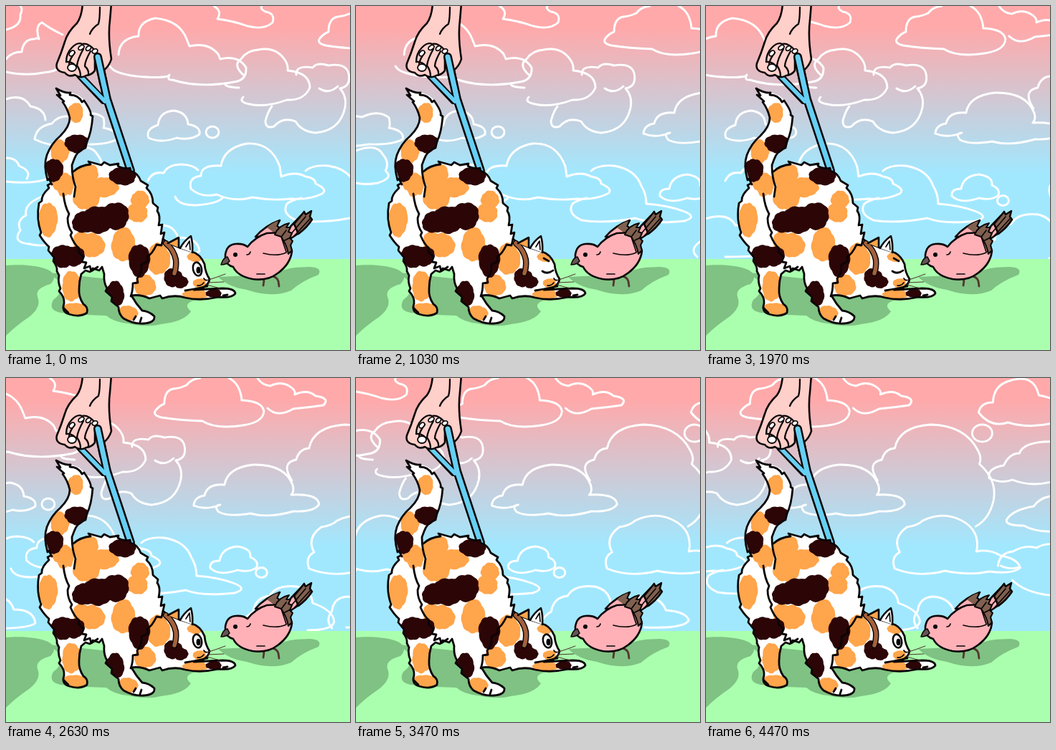
Write an HTML page that moves like this. It is 480 by 480 pixels and loops after 4510 ms.

```html
<!DOCTYPE html>
<html lang="en">
<head>
<meta charset="utf-8">
<title>Cat and bird</title>
<style>
html, body { margin: 0; width: 100%; height: 100%; overflow: hidden; }
svg { display: block; width: 100vw; height: 100vh; }
path, ellipse, circle { stroke-linecap: round; stroke-linejoin: round; }
.line { fill: none; stroke: #0a0506; stroke-width: 2.8; }
.fine { fill: none; stroke: #0a0506; stroke-width: 1.7; }
.thin { fill: none; stroke: #4a302c; stroke-width: 1; }
.ink { stroke: #0a0506; stroke-width: 2.6; }
.strap { fill: none; stroke: #66cff3; }
#clouds * { fill: none; stroke: #fff; stroke-width: 2.9; }
.shade { fill: #7fc283; }
.orange { fill: #ffa54b; }
.dark { fill: #2c0507; }
.skin { fill: #ffcfca; }
.pink { fill: #ffb1b7; }
.brown { fill: #80604f; }
</style>
</head>
<body>
<svg viewBox="0 0 480 480" preserveAspectRatio="none">
  <defs>
    <linearGradient id="sky" x1="0" y1="30" x2="0" y2="235" gradientUnits="userSpaceOnUse">
      <stop offset="0" stop-color="#ffa9aa"/>
      <stop offset="1" stop-color="#a1e8ff"/>
    </linearGradient>
    <clipPath id="bodyClip"><path id="bodyShape"/></clipPath>
    <clipPath id="tailClip"><path id="tailShape"/></clipPath>
  </defs>

  <rect width="480" height="480" fill="url(#sky)"/>
  <g id="clouds"></g>
  <rect y="353" width="480" height="127" fill="#aaffae"/>

  <g class="shade">
    <path d="M0 362C20 360 50 362 62 370Q72 378 62 388Q40 394 44 406Q50 420 32 434Q14 446 0 460Z"/>
    <path d="M60 372L76 386Q80 400 66 410Q58 424 76 428L112 431L140 432Q150 441 170 443Q198 449 216 444Q250 440 258 426Q246 416 262 411L312 407L300 396L180 385Z"/>
    <path d="M296 378Q310 392 336 396Q372 408 398 397Q412 384 436 375Q442 365 424 364Q396 364 384 370L340 376Z"/>
  </g>

  <!-- leash -->
  <path class="line" style="stroke-width:10" d="M103 97L136 132"/>
  <path class="line" style="stroke-width:12" d="M128 70L141 130L174 230"/>
  <path class="strap" stroke-width="5.5" d="M103 97L138 133"/>
  <path class="strap" stroke-width="7" d="M128 70L141 130L174 230"/>

  <!-- hand -->
  <path class="skin ink" d="M107 -4Q106 14 99 24Q86 36 82 50Q77 66 71 80Q68 91 82 93Q88 100 96 96Q104 102 112 97Q120 96 124 90L124 68L136 90Q144 84 147 74Q142 42 145 20L147 -4Z"/>
  <path class="line" style="stroke-width:12" d="M128 71L136 108"/>
  <path class="strap" stroke-width="7" d="M128 71L137 112"/>
  <path class="line" style="stroke-width:2.3" d="M131 2Q131 18 129 25Q120 31 117 39M84 78Q84 66 92 58Q100 50 106 53Q115 51 124 62M96 65Q89 74 88 81M108 60Q100 74 99 83Q104 90 104 98M118 63Q110 77 110 84Q116 89 115 96M84 78Q92 77 98 84"/>
  <g fill="#fff" class="ink" style="stroke-width:1.8">
    <ellipse cx="92" cy="86" rx="6" ry="5"/>
    <ellipse cx="92" cy="66" rx="4.5" ry="3" transform="rotate(-48 92 66)"/>
    <ellipse cx="105" cy="58" rx="4.5" ry="2.8" transform="rotate(-35 105 58)"/>
    <ellipse cx="115" cy="59" rx="4" ry="2.8" transform="rotate(-40 115 59)"/>
    <ellipse cx="124" cy="63" rx="4" ry="3" transform="rotate(-25 124 63)"/>
  </g>

  <!-- cat -->
  <use href="#bodyShape" fill="#fff"/>
  <g id="bodySpots" clip-path="url(#bodyClip)"></g>
  <use href="#bodyShape" class="line"/>
  <use href="#tailShape" fill="#fff"/>
  <g id="tailSpots" clip-path="url(#tailClip)"></g>
  <path class="line" d="M64 249L60 241L58 243Q52 222 57 208Q63 192 76 181Q89 168 89 156Q86 143 79 134L81 133L71 124L76 125L70 115Q82 122 90 121L89 124Q101 124 106 134L109 132Q120 148 118 152L121 154Q119 178 113 189L111 198Q99 202 95 214L92 222Q92 240 97 252L95 266"/>
  <path class="line" d="M80 262Q82 280 88 290L86 296Q86 308 92 316L90 320Q96 334 102 338L101 343L108 350L106 357L112 358L109 366L117 363L119 370L128 364"/>
  <path class="line" d="M219 325L217 334L210 333Q204 346 197 350L198 356L189 361Q190 374 183 380L184 386L177 387Q177 398 174 405M80 421L87 428M178 438L181 433M187 441L189 435M303 404L309 403M250 397Q268 394 281 391"/>
  <path d="M223 331Q234 340 237 354Q238 364 235 373" fill="none" stroke="#0a0506" stroke-width="8.5"/>
  <path d="M223 331Q234 340 237 354Q238 364 235 373" fill="none" stroke="#a3613b" stroke-width="5.5"/>
  <path class="orange ink" d="M226 331L241 323L241 337"/>
  <path class="ink" fill="#fff" d="M243 338Q248 328 258 321Q261 331 260 344"/>
  <path class="fine" d="M251 336L256 328L257 340M276 380Q278 384 283 382M276 386Q272 391 267 390"/>
  <g id="open">
    <ellipse class="ink" cx="267" cy="367" rx="6" ry="9.5" fill="#fff" transform="rotate(-12 267 367)"/>
    <ellipse cx="268.5" cy="368.5" rx="3" ry="4.8"/>
  </g>
  <path id="shut" class="line" d="M260 370Q267 375 275 369M262 352L269 356"/>
  <path class="thin" d="M280 383Q293 379 306 374M281 386L304 385M280 389L299 394"/>

  <!-- bird -->
  <path class="line" style="stroke:#56352f" d="M356 379L360 383L359 390M367 376Q378 377 380 384L381 391"/>
  <path class="pink ink" d="M388 318Q400 304 411 293L418 309Q408 318 398 324Z"/>
  <path class="brown ink" d="M402 304L416 287L418 291L426 286L424 294L427 298Q420 309 408 318Z"/>
  <path class="fine" d="M396 320L418 294M402 321L424 297"/>
  <path class="pink ink" d="M348 322Q362 306 382 299L378 307L381 309L374 322Z"/>
  <path class="brown" d="M364 309Q372 302 380 300L377 308L379 310L375 317Z"/>
  <path class="pink ink" d="M306 347Q308 333 320 332Q331 331 337 336Q348 322 364 317L384 316Q396 327 399 342Q397 360 379 373Q365 384 344 381Q323 377 317 364Q308 362 306 353Z"/>
  <path class="brown ink" style="stroke-width:2" d="M375 319Q380 306 395 303L391 309L397 309L394 315L399 317L396 324L400 328L397 334L399 341L394 346Q392 334 384 322Z"/>
  <path class="fine" d="M385 321L391 313M389 327L397 323M359 345Q378 350 391 344M384 322L391 343M350 374L361 374M336 347Q340 347 341 343"/>
  <path class="ink" fill="#665455" style="stroke-width:1.5" d="M309 350Q303 351 300 361Q308 361 312 356Z"/>
  <circle cx="320" cy="347" r="3"/>
</svg>

<script>
const LOOP = 4510, STEP = 2.9, FPS = 30;
const NS = "http://www.w3.org/2000/svg";
const $ = id => document.getElementById(id);

function add(parent, tag, attrs) {
  const el = document.createElementNS(NS, tag);
  for (const k in attrs) el.setAttribute(k, attrs[k]);
  parent.appendChild(el);
  return el;
}

// Outlines laid out on one long strip that slides left.
const clouds = [
  "M0 33Q22 28 20 12Q24 4 20 0M0 74Q8 64 22 64Q24 46 40 46Q44 44 46 46Q40 28 50 23Q62 32 79 40M0 92Q28 98 52 93Q68 92 78 84",
  "M145 84Q150 94 182 98Q212 101 226 98M157 68Q158 45 185 42Q184 22 208 17Q242 20 252 46L256 56Q282 50 296 67L299 74Q324 68 335 86Q336 104 318 106Q270 115 232 103Q224 104 228 96",
  "M290 0Q302 7 295 18Q318 21 337 28Q360 34 372 23Q376 10 362 8Q354 4 357 0",
  "M306 108Q304 113 325 114M331 96Q316 82 328 74Q336 62 352 61Q376 56 389 75Q394 82 393 90Q424 93 424 114Q416 132 392 131Q362 142 340 137Q324 134 331 127",
  "M405 96Q404 82 428 86Q434 78 450 83Q474 79 478 94Q482 112 466 115Q476 126 473 142Q466 174 432 177Q412 175 404 161Q386 154 374 168Q362 172 362 160Q366 146 371 140M463 112Q450 124 437 115",
  "M540 0Q556 8 558 31Q586 32 589 46Q588 62 560 66Q522 72 503 60Q470 59 446 55Q433 52 438 45Q444 38 450 36Q450 17 463 15Q473 14 481 10Q488 1 500 0",
  "M580 0Q586 10 598 11Q612 4 624 11Q634 17 632 23Q650 15 661 25Q682 28 672 38Q652 41 630 43Q608 56 594 42",
  "M0 130Q24 122 34 140Q54 143 55 159M40 186Q42 168 64 164Q74 150 98 155Q122 144 136 156Q138 166 136 170Q158 174 155 186Q140 194 108 193Q68 200 40 186",
  "M199 184Q194 172 212 166Q214 147 235 146Q253 149 254 165Q272 168 270 179Q258 188 238 184Q216 192 199 184",
  "M0 212Q15 212 18 223Q36 230 29 241M0 245Q42 249 60 240M55 264Q24 275 28 292Q14 299 20 313Q8 330 32 332Q52 337 72 330",
  "M80 206Q118 188 128 208Q137 219 131 230Q143 240 120 247Q102 250 90 247",
  "M198 244Q204 230 220 233Q226 221 246 221Q262 222 268 229M236 266Q240 278 265 278Q294 276 302 268",
  "M258 255Q254 239 272 237Q272 221 300 223Q304 198 336 192Q370 190 382 224L384 238Q404 230 418 238Q432 240 432 248Q450 256 441 262Q422 271 398 269Q372 272 344 267Q318 274 294 263Q272 268 258 255",
  "M418 230Q428 221 450 223Q480 228 488 251Q495 262 495 276Q524 278 546 286Q568 294 548 300Q502 305 480 296Q436 304 405 299Q384 290 392 276Q400 270 412 268",
  "M170 297Q202 287 212 306Q234 304 240 323Q268 323 270 342Q262 350 198 350",
  "M491 178Q492 166 506 164Q510 147 534 149Q538 125 574 121Q618 120 629 149Q632 158 627 163Q664 161 666 176Q660 187 630 186Q596 196 570 189Q540 194 526 187Q518 178 528 177Q508 185 491 178",
  "M514 265Q513 255 527 255Q530 237 552 235Q572 238 570 250Q582 255 579 264Q570 272 552 268Q526 277 514 265",
  "M566 350Q553 339 574 326Q577 306 597 304Q606 288 635 291Q655 296 657 314Q686 324 687 340Q685 352 650 352",
  "M684 349Q674 338 684 325Q686 306 706 305Q728 307 734 324Q762 326 766 338Q760 350 704 348",
  "M628 143Q612 118 634 114Q638 99 652 98Q658 68 702 65Q750 66 768 101Q774 112 770 120Q795 142 790 170Q784 197 765 207",
  "M652 266Q646 250 659 243Q648 223 669 208Q684 206 691 199Q716 187 739 196Q769 208 767 236L766 242Q784 238 800 248Q824 252 827 265Q816 274 784 270Q756 276 722 269Q685 279 652 266",
  "M769 48Q772 34 789 34Q790 10 812 4Q846 -7 853 24Q868 27 880 32M769 48Q786 70 810 62Q842 72 880 61",
  "M784 140Q780 126 804 122Q812 105 826 105Q832 87 880 89M784 140Q802 148 816 142Q846 154 880 142",
  "M880 164Q856 164 846 179Q816 184 808 198Q806 206 832 206Q850 216 880 214",
  "M796 262Q798 244 817 242Q834 232 850 237Q860 230 880 232M800 262Q812 268 826 264M816 282Q836 302 880 304"
];
for (const d of clouds) add($("clouds"), "path", { d });
for (const [cx, cy, rx, ry] of [[288, 176, 9, 8], [585.5, 271.5, 8, 7], [774, 77, 14, 12]])
  add($("clouds"), "ellipse", { cx, cy, rx, ry });

$("bodyShape").setAttribute("d",
  "M66 246L58 250L60 254Q49 264 50 272L46 275Q42 298 49 316L47 320Q54 331 60 336L59 341L67 351L66 356Q72 364 71 370L74 376" +
  "Q72 385 76 394L74 398Q82 406 81 415Q77 427 88 430Q103 435 113 428Q115 420 108 416Q101 406 102 394Q102 384 105 374L111 369" +
  "L117 371L121 366L130 369L134 364L137 374Q136 386 141 394L139 398L148 406L147 412L157 420Q157 430 164 436Q178 444 192 443" +
  "Q208 442 207 433Q200 426 190 425Q181 415 175 404Q188 402 200 408L215 404L218 408Q235 402 250 407Q272 412 296 406Q316 408 320 401" +
  "Q319 394 302 394L262 396Q282 394 284 381Q278 372 277 360Q271 346 260 343L242 337L227 331L219 325" +
  "L221 316L216 318L218 305L213 306Q216 292 211 286L212 281L205 275Q205 262 196 254L198 250L188 244Q184 233 174 230L173 226" +
  "Q163 228 156 223L157 220L145 222L137 218L133 222L115 217L118 221Q104 222 94 231Z");
$("tailShape").setAttribute("d",
  "M68 256Q54 232 55 217Q58 198 76 181Q89 168 89 156Q86 143 79 134L71 124L76 125L70 115Q82 122 90 121Q109 124 114 142" +
  "Q121 154 119 170Q115 198 104 204Q92 212 92 230Q93 244 97 254L95 266Z");

// Soft-edged patch with a few lobes, shaped by its own position.
function patch(parent, cls, cx, cy, rx, ry) {
  let d = "";
  const n = 9;
  for (let i = 0; i <= n; i++) {
    const at = (k, s) => {
      const a = k / n * 2 * Math.PI + cx;
      const w = s * (1 + .05 * Math.sin(3 * a + cy));
      return (cx + rx * w * Math.cos(a)).toFixed(1) + " " + (cy + ry * w * Math.sin(a)).toFixed(1);
    };
    d += i ? "Q" + at(i - .5, 1.14) + " " + at(i, .96) : "M" + at(0, .96);
  }
  add(parent, "path", { d: d + "Z", class: cls });
}
const body = $("bodySpots"), tail = $("tailSpots");
for (const p of [
  [110, 236, 19, 18], [112, 264, 19, 21], [138, 253, 19, 14], [80, 254, 9, 12], [187, 270, 13, 12], [183, 288, 15, 14],
  [59, 298, 13, 24], [106, 328, 13, 13], [121, 334, 17, 17], [164, 333, 17, 24], [92, 391, 14, 21],
  [96, 424, 18, 10], [170, 429, 14, 11], [194, 390, 15, 15], [213, 353, 16, 22],
  [264, 402, 18, 7], [264, 350, 11, 7], [270, 387, 9, 7]
]) patch(body, "orange", ...p);
for (const p of [
  [163, 237, 19, 13], [109, 302, 17, 15], [129, 298, 22, 19], [152, 293, 20, 19],
  [79, 349, 16, 16], [94, 349, 16, 14], [186, 355, 15, 23], [152, 402, 13, 18],
  [233, 379, 13, 13], [244, 385, 10, 9], [290, 401, 11, 6]
]) patch(body, "dark", ...p);
for (const p of [[97, 149, 11, 14], [75, 203, 13, 17], [80, 250, 15, 17]]) patch(tail, "orange", ...p);
for (const p of [[99, 192, 17, 13], [67, 229, 13, 16]]) patch(tail, "dark", ...p);

function draw(ms) {
  const t = ms % LOOP;
  const frame = Math.floor((t + 5) * FPS / 1000);
  $("clouds").setAttribute("transform", `translate(${(-STEP * frame).toFixed(1)} 0)`);
  const shut = t >= 750 && t < 2300;
  $("open").setAttribute("visibility", shut ? "hidden" : "visible");
  $("shut").setAttribute("visibility", shut ? "visible" : "hidden");
}

const start = performance.now();
function tick() {
  draw(performance.now() - start);
  requestAnimationFrame(tick);
}
tick();
</script>
</body>
</html>
```
